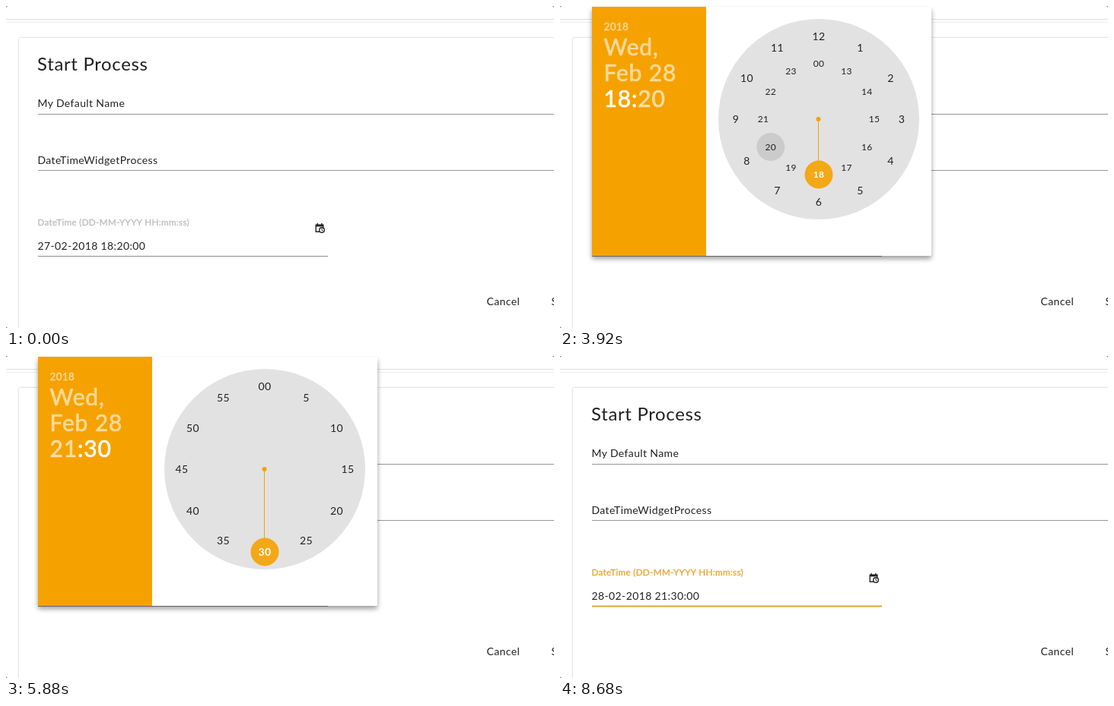
Animation of 720x424 px, one loop 9100 ms. Source, as an HTML page:

```html
<!DOCTYPE html>
<html lang="en">
<head>
<meta charset="utf-8">
<title>Date time picker</title>
<style>
  html, body { margin: 0; width: 100%; height: 100%; overflow: hidden; background: #777; }
  svg { display: block; width: 720px; height: 424px; }
  text { font: 14px Lato, "Open Sans", sans-serif; letter-spacing: .027em; fill: #212121; }
  .title { font-size: 24px; }
  .label { font-size: 11.7px; stroke-width: .35px; }
  .head { font-size: 30px; fill: #fff; stroke: #fff; stroke-width: .7px; }
  .year { font-size: 13.5px; stroke-width: .4px; }
  .dim { opacity: .6; }
  .mid { text-anchor: middle; }
  .week { font-size: 11px; fill: #9a9a9a; }
  .day { font-size: 13px; }
  .inner { font-size: 12px; }
  .on { font-weight: 700; fill: #fff; }
</style>
</head>
<body>
<svg id="stage" viewBox="0 0 720 424">
  <defs>
    <filter id="lift" x="-10%" y="-10%" width="120%" height="125%">
      <feDropShadow dx="0" dy="4" stdDeviation="3" flood-opacity=".38"/>
    </filter>
    <filter id="soft" x="-5%" y="-5%" width="110%" height="110%">
      <feDropShadow dx="0" dy="0" stdDeviation="1" flood-opacity=".3"/>
    </filter>
  </defs>
  <rect width="720" height="424" rx="3" fill="#fff"/>
  <path d="M0 17.5H720" stroke="#ddd"/>
  <path d="M0 21.5H720" stroke="#eee"/>
  <rect x="17" y="42" width="760" height="440" rx="2" fill="#fff" filter="url(#soft)"/>
  <text class="title" x="41" y="85">Start Process</text>
  <text x="41.500" y="133">My Default Name</text>
  <text x="41.500" y="208">DateTimeWidgetProcess</text>
  <path d="M42 142.500H720M42 216.500H720" stroke="#949494"/>
  <text x="631.500" y="394">Cancel</text>
  <text x="716.500" y="394">Start</text>
  <g fill="none" stroke="#222" stroke-width="1.400">
    <path d="M407.200 288.200H416.800V297.300H407.200Z"/>
    <path d="M407 289.200H417" stroke-width="2.500"/>
    <path d="M409.200 286V289M414.800 286V289"/>
    <circle cx="415" cy="295" r="3.300" fill="#fff"/>
    <path d="M415 293V295.300L416.600 296.200" stroke-width="1"/>
  </g>
  <g id="live"></g>
</svg>
<script>
const LOOP = 9100, TICK = 70;
const OPEN = 1680, HOVER_DAY = 2520, PICK_DAY = 3290, PICK_HOUR = 4200, MINUTES = 4410,
      PICK_MINUTE = 5880, CLOSE = 6020;
const CARET_FLIPS = [CLOSE, 6580, 7140, 7630, 8190, 8680];
const HOVERS = [[PICK_DAY, 6], [3640, 19], [3850, 20], [4060, 21], [MINUTES, -1], [5390, 30]];
const ORANGE = '#f5a200', CX = 340, CY = 149;
const live = document.getElementById('live');

const text = (x, y, content, cls = '', extra = '') =>
  `<text x="${x}" y="${y}" class="${cls}" ${extra}>${content}</text>`;
const disc = (x, y, r, fill, extra = '') => `<circle cx="${x}" cy="${y}" r="${r}" fill="${fill}" ${extra}/>`;
const easeOut = p => 1 - (1 - Math.min(1, Math.max(0, p))) ** 3;
const pad = n => String(n).padStart(2, '0');

function field(t) {
  const focused = t >= CLOSE;
  const color = focused ? '#e8a636' : '#bdbdbd';
  const value = t > CLOSE ? '28-02-2018 21:30:00' : '27-02-2018 18:20:00';
  let out = text(41.5, 289, 'DateTime (DD-MM-YYYY HH:mm:ss)', 'label', `style="fill:${color};stroke:${color}"`)
    + text(41.5, 321, value) + '<path d="M42 329.5H423" stroke="#8c8c8c"/>';
  if (t > CLOSE) {
    const half = 190.5 * (.5 + .5 * easeOut((t - CLOSE) / 300));
    out += `<path d="M${232.5 - half} 329.5h${2 * half}" stroke="#dba93a" stroke-width="2"/>`;
  }
  if (CARET_FLIPS.filter(at => t >= at).length % 2) out += '<path d="M182.5 307V325" stroke="#111"/>';
  return out;
}

function header(t) {
  const dated = t < PICK_DAY, hours = !dated && t < MINUTES;
  const dim = off => off ? 'dim' : '';
  const lines = dated ? ['Tue, Feb', '27'] : ['Wed,', 'Feb 28'];
  const span = (s, lit) => `<tspan ${lit ? '' : 'fill-opacity=".6" stroke-opacity=".6"'}>${s}</tspan>`;
  const time = span(t < PICK_HOUR ? 18 : 21, hours) + span(':', !dated)
    + span(t < PICK_MINUTE ? 20 : 30, !dated && !hours);
  return text(57.5, 32, '2018', 'head year dim')
    + lines.map((line, i) => text(57.5, 65 + 34 * i, line, 'head ' + dim(!dated))).join('')
    + text(57.5, 133, time, 'head');
}

function calendar(t) {
  let out = text(CX, 36, 'February', 'mid')
    + '<path d="M227 28L222 33L227 38M453.500 28L458.500 33L453.500 38" fill="none" stroke="#111" stroke-width="2"/>';
  ['Sun', 'Mon', 'Tue', 'Wed', 'Thu', 'Fri', 'Sat'].forEach((name, i) => {
    out += text(220 + 40 * i, 71, name, 'mid week');
  });
  for (let day = 1; day <= 28; day++) {
    const slot = day + 3, x = 220 + 40 * (slot % 7), y = 105 + 40 * Math.floor(slot / 7);
    const chosen = day === 27;
    if (chosen) out += disc(x, y, 16, ORANGE) + disc(x, y, 17.5, 'none', `stroke="${ORANGE}"`);
    if (day === 28 && t >= HOVER_DAY) out += disc(x, y, 18, '#e1e1e1');
    out += text(x, y + 4.7, day, 'mid day' + (chosen ? ' on' : ''));
  }
  return out;
}

function place(turn, radius) {
  const a = turn * 2 * Math.PI;
  return [CX + radius * Math.sin(a), CY - radius * Math.cos(a)];
}

const hourRadius = h => h > 12 || h === 0 ? 73 : 109;

function dial(values, radiusOf, perTurn, chosen, hovered, scale, opacity) {
  const cells = values.map(v => {
    const radius = radiusOf(v), [x, y] = place(v / perTurn, radius), inner = radius < 100;
    const back = v === chosen ? disc(x, y, 18.5, ORANGE, 'opacity=".9"')
      : v === hovered ? disc(x, y, 18.5, '#cbcbcb') : '';
    const label = v === 0 ? '00' : v;
    return back + text(x, y + (inner ? 4.3 : 5), label,
      'mid' + (inner ? ' inner' : '') + (v === chosen ? ' on' : ''));
  });
  return `<g opacity="${opacity}" transform="translate(${CX} ${CY}) scale(${scale}) translate(${-CX} ${-CY})">`
    + cells.join('') + '</g>';
}

function clock(t) {
  const shift = easeOut((t - MINUTES) / 350);
  const hour = t < PICK_HOUR ? 18 : 21, minute = t < PICK_MINUTE ? 20 : 30;
  const hovered = HOVERS.filter(([at]) => t >= at).pop()[1];
  const hoursShown = t < MINUTES;
  const [x, y] = hoursShown ? place(hour / 12, hourRadius(hour) - 18) : place(minute / 60, 91);
  let out = disc(CX, CY, 132, '#e2e2e2') + disc(CX - .5, CY, 3, ORANGE)
    + `<path d="M${CX - .5} ${CY}L${x - .5} ${y}" stroke="${ORANGE}"/>`;
  if (shift < 1) {
    const hours = Array.from({ length: 24 }, (_, i) => i);
    out += dial(hours, hourRadius, 12, hour, hoursShown ? hovered : -1, 1 + .2 * shift, 1 - shift);
  }
  if (shift > 0) {
    const minutes = Array.from({ length: 12 }, (_, i) => i * 5);
    out += dial(minutes, () => 109, 60, minute, hovered, .8 + .2 * shift, shift);
  }
  return out;
}

function picker(t) {
  return '<path d="M42 1H486a2 2 0 0 1 2 2V327a2 2 0 0 1 -2 2H42Z" fill="#fff" filter="url(#lift)"/>'
    + `<path d="M42 1H192V329H42Z" fill="${ORANGE}"/>`
    + '<path d="M42 329.5H423" stroke="#666"/>'
    + header(t) + (t < PICK_DAY ? calendar(t) : clock(t));
}

let shown = -1;
function frame(now) {
  const t = Math.floor(now % LOOP / TICK) * TICK;
  if (t !== shown) {
    live.innerHTML = field(t) + (t >= OPEN && t < CLOSE ? picker(t) : '');
    shown = t;
  }
  requestAnimationFrame(frame);
}
frame(performance.now());
</script>
</body>
</html>
```
